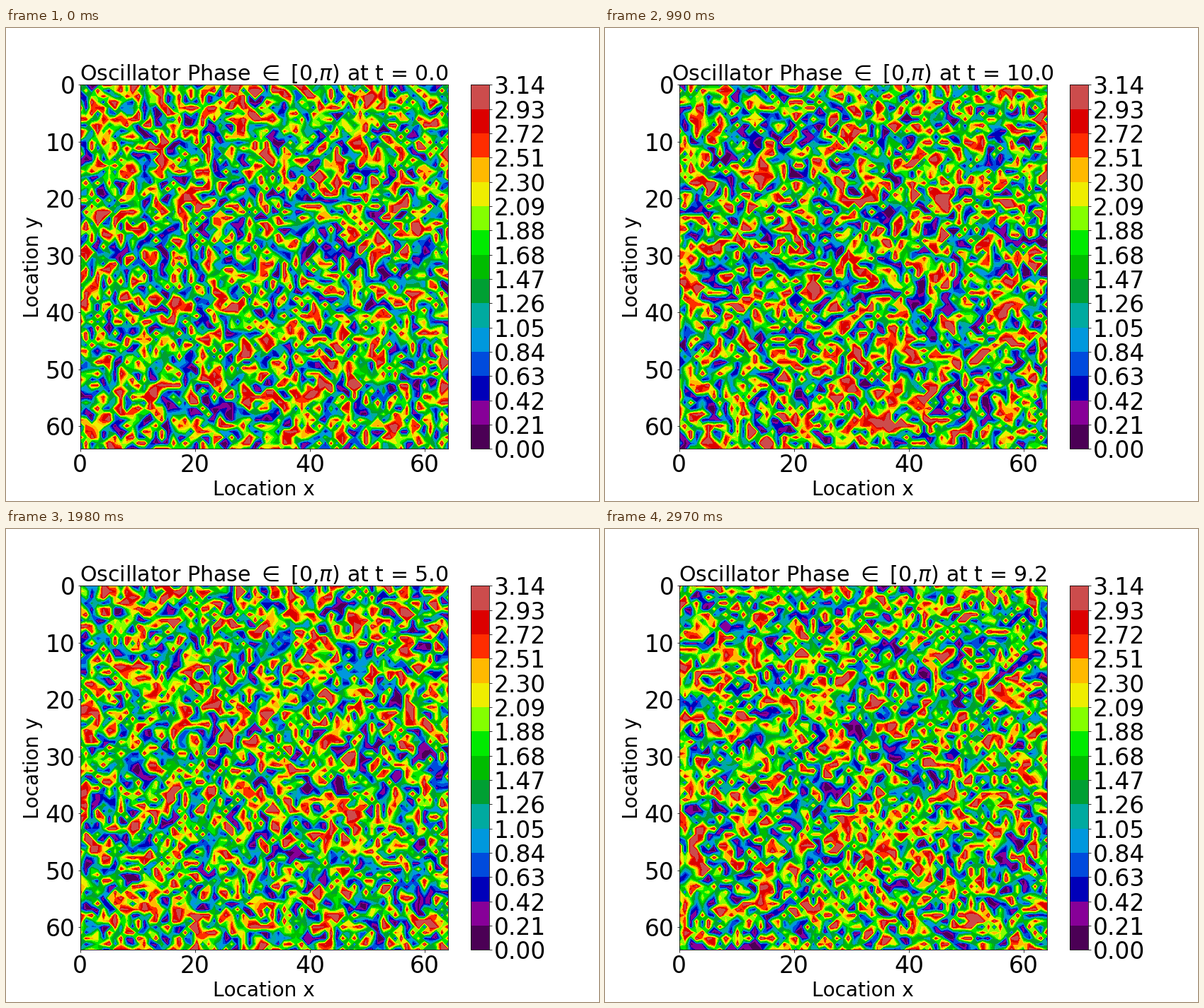
These frames come from a looping animation (837x669 px, 3300 ms). A matplotlib script:

```python
import numpy as np
import matplotlib.pyplot as plt
from matplotlib.animation import FuncAnimation

WIDTH, HEIGHT, DPI = 837, 669, 72
SIZE = 64
INTERVAL = 330
# Solver output times, played in alphabetical order
TIMES = ["0.0", "0.1", "1.1", "10.0", "2.3", "3.6", "5.0", "6.4", "7.8", "9.2"]

plt.rcParams["font.family"] = "DejaVu Sans"
plt.rcParams["text.kerning_factor"] = 6

fig, ax = plt.subplots(figsize=(WIDTH / DPI, HEIGHT / DPI), dpi=DPI)
coords = np.linspace(0, SIZE, SIZE)
levels = np.linspace(0, np.pi, 16)


def draw_phase(frame):
    # A random angle seen through its cosine favours both ends of the range
    angle = np.random.default_rng(frame).uniform(0, np.pi, (SIZE, SIZE))
    phase = np.pi * (1 - np.cos(angle)) / 2
    return ax.contourf(coords, coords, phase, levels=levels, cmap="nipy_spectral")


contours = draw_phase(0)
colorbar = fig.colorbar(contours, ax=ax, ticks=levels, format="%.2f")
colorbar.ax.tick_params(labelsize=33)

ax.set_xlim(0, SIZE)
ax.set_ylim(SIZE, 0)
ax.set_xticks(range(0, SIZE, 20))
ax.set_yticks(range(0, SIZE, 10))
ax.tick_params(labelsize=33)
ax.set_xlabel("Location x", fontsize=28)
ax.set_ylabel("Location y", fontsize=28)
title = ax.set_title("", fontsize=30)


def update(frame):
    global contours
    contours.remove()
    contours = draw_phase(frame)
    title.set_text(rf"Oscillator Phase $\in$ [0,$\pi$) at t = {TIMES[frame]}")
    return contours, title


animation = FuncAnimation(fig, update, frames=len(TIMES), interval=INTERVAL,
                          init_func=lambda: [], repeat=True, repeat_delay=0)
plt.show()
```
